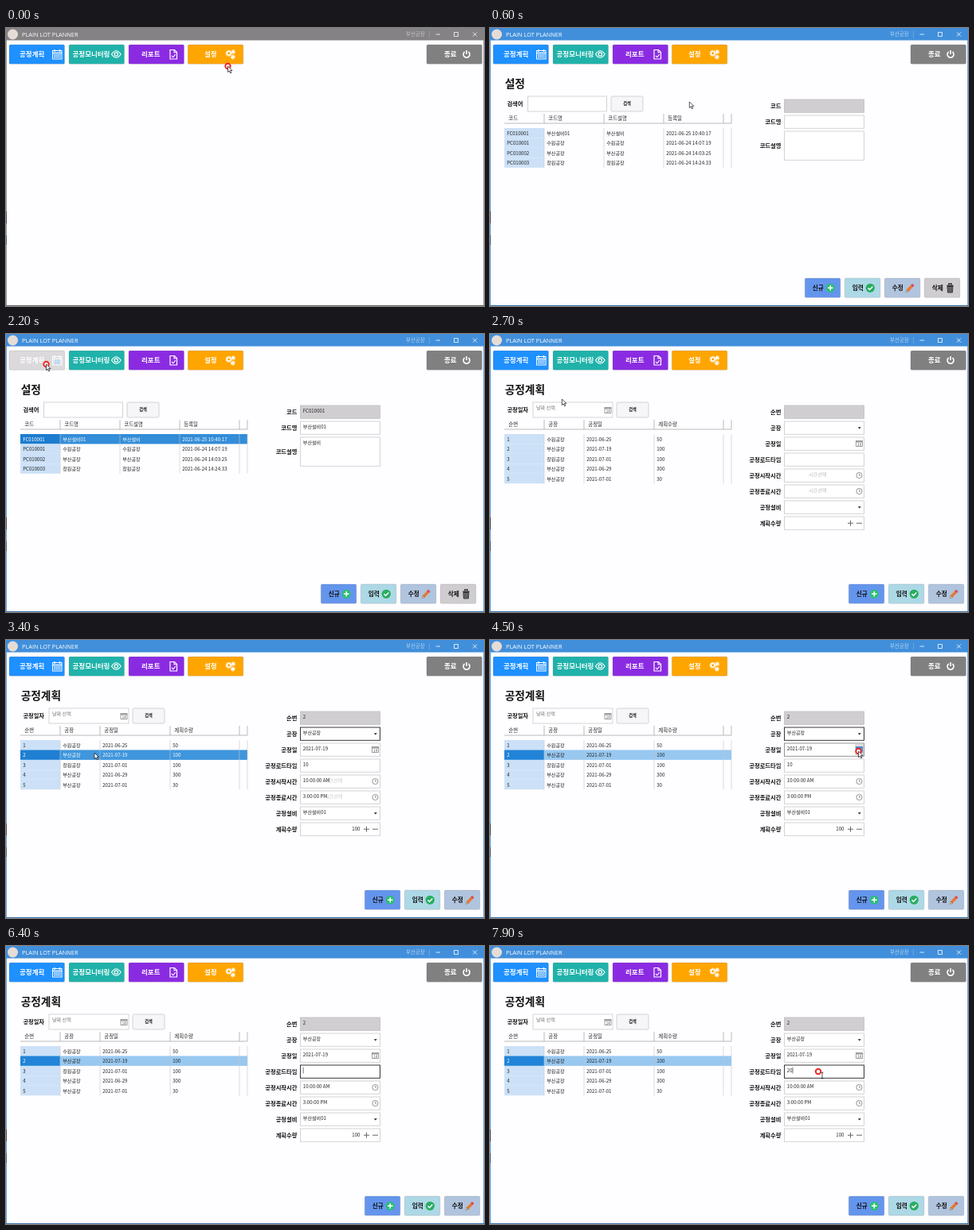
An HTML page for the animation above (8000 ms loop, 600 px wide and 350 px high).

```html
<!DOCTYPE html>
<html>
<head>
<meta charset="utf-8">
<style>
html, body { margin: 0; width: 100%; height: 100%; overflow: hidden; background: #fefdff }
svg { display: block; width: 600px; height: 350px; font-family: "Noto Sans CJK KR", "Noto Sans CJK JP", "Noto Sans CJK", sans-serif; white-space: pre }
</style>
</head>
<body>
<svg id="stage" viewBox="0 0 600 350"></svg>
<script>
const LOOP = 8000;
const stage = document.getElementById('stage');

const rect = (x, y, w, h, fill, more = '') => `<rect x="${x}" y="${y}" width="${w}" height="${h}" fill="${fill}" ${more}/>`;
const path = (d, color, width = 1, fill = 'none') => `<path d="${d}" stroke="${color}" stroke-width="${width}" fill="${fill}"/>`;
const ring = (x, y, r, color, width, more = '') => `<circle cx="${x}" cy="${y}" r="${r}" fill="none" stroke="${color}" stroke-width="${width}" ${more}/>`;
const disc = (x, y, r, fill) => `<circle cx="${x}" cy="${y}" r="${r}" fill="${fill}"/>`;
const text = (x, y, s, size = 6.1, fill = '#222', more = '') => `<text x="${x}" y="${y}" font-size="${size}" fill="${fill}" ${more}>${s}</text>`;
const bold = (x, y, s, size, fill = '#111', more = '') => text(x, y, s, size, fill, 'font-weight="700" ' + more);
const box = (x, y, w, h, stroke = '#d0ced2', fill = '#fff') => rect(x, y, w, h, fill, `stroke="${stroke}" stroke-width=".9"`);

// [time, x, y] of the pointer tip
const route = [
  [0, 278.5, 48], [200, 278.5, 48], [900, 232, 122], [1200, 216, 132.5], [1500, 216, 132.5],
  [1900, 58, 40], [2100, 50.5, 38], [2300, 50.5, 38], [2800, 95, 87], [3000, 117, 157],
  [3200, 111, 142], [3500, 111, 142], [4200, 459, 141], [4400, 462.5, 140], [4800, 462.5, 140],
  [5400, 417.5, 170], [5700, 417.5, 170], [6000, 384, 160], [6300, 372, 160],
  [7100, 428, 160], [7400, 417, 163], [8000, 417, 163]
];
const clicks = [[0, 100], [1200, 1300], [2200, 2300], [3200, 3300], [4500, 4800], [5500, 5600], [6000, 6300], [7900, 8000]];
const clamp = v => Math.max(0, Math.min(1, v));
const ease = v => v * v * (3 - 2 * v);

function pointerAt(t) {
  const i = route.findIndex(k => k[0] > t);
  const [a, b] = [route[i - 1], route[i]];
  const k = ease((t - a[0]) / (b[0] - a[0]));
  return [a[1] + (b[1] - a[1]) * k, a[2] + (b[2] - a[2]) * k];
}

const gear = (x, y, r) => ring(x, y, r, '#fff', 1.5) + ring(x, y, r + 1.2, '#fff', 1.3, `stroke-dasharray="${r * .5} ${r * .45}"`);
const icons = {
  calendar: rect(58.5, 28.5, 11.5, 10.5, 'none', 'stroke="#fff"') + path('M58.5 31.5h11.5M61 27v3M67.5 27v3', '#fff', 1.4) +
    path('M60 34h8.5M60 36.5h8.5', '#fff', 1.6) + path('M62 32v6M64.3 32v6M66.6 32v6', '#1e90ff', .5),
  eye: path('M132.5 33q5.8-8.5 11.6 0q-5.8 8.5-11.6 0z', '#fff', 1.2) + ring(138.3, 33, 2.2, '#fff', 1.2),
  report: path('M206 27.5h5.5l3 3v8.5h-8.5z', '#fff', 1.2) + path('M211 27.5v3.3h3.5M208 35l1.8 1.8l3-3.6', '#fff', 1.1),
  gears: gear(279.7, 31.8, 2.3) + gear(285.3, 30, 1) + gear(284.8, 36.5, 1.2),
  power: path('M575.7 30a4 4 0 1 0 4.8 0M578.1 28v5', '#fff', 1.6)
};
const menu = [
  [4, '#1e90ff', 17, '공정계획', icons.calendar], [79, '#20b2aa', 83.5, '공정모니터링', icons.eye],
  [154, '#8a2be2', 170, '리포트', icons.report], [228.3, '#ffa500', 249, '설정', icons.gears],
  [528, '#808080', 550, '종료', icons.power]
];

function shell(active, hover) {
  const bar = active ? '#418fdb' : '#848284';
  return rect(0, 0, 600, 350, '#fefdff') + rect(0, 0, 600, 15.5, bar) + rect(0, 0, .8, 350, bar) +
    rect(599.3, 0, .7, 350, bar) + rect(0, 349, 600, 1, active ? '#3a75ad' : '#6c6c6c') +
    rect(0, 231, 1, 15, '#4a5560') + rect(0, 261, 1, 12, '#4a6d80') +
    disc(8.5, 8, 6.5, '#e6dcd6') +
    text(20, 11, 'PLAIN LOT PLANNER', 7.4, '#fff', 'style="font-family:\'Open Sans\',sans-serif"') +
    text(502, 10.4, '부산공장', 6.4, active ? '#b9d6f2' : '#c9c7c9') +
    path('M531.5 4v8', active ? '#77afe4' : '#a5a3a5', .7) +
    path('M539.5 8h5.5M562.5 5.5h5v5h-5zM586 5.5l5 5M591 5.5l-5 5', '#fff', .8) +
    menu.map(([x, color, tx, label, icon], i) =>
      rect(x, 21, 69.5, 24.3, hover && !i ? '#dbd9db' : color, 'rx="1.5" stroke="#777" stroke-opacity=".35" stroke-width=".6"') +
      bold(tx, 36.3, label, 8.5, '#fff') + icon).join('');
}

const actionIcons = [
  disc(32, 12.3, 5.6, '#2ebd78') + path('M32 9v6.6M28.7 12.3h6.6', '#fff', 1.5),
  disc(32, 12.3, 5.6, '#27ae60') + path('M29.2 12.4l2.1 2.1l3.7-4', '#fff', 1.5),
  path('M28.5 16l6.5-7', '#e8792f', 3.4) + path('M34.3 9.8l1.7-1.8', '#d8485a', 3.4) + path('M27 17.6l1-3.2l2.2 2z', '#444', .4, '#f3d2a2'),
  path('M28 9.3h8.5M30.5 8.5v-1.5h3.5v1.5', '#333', 1.3) + path('M28.7 10.5h7l-.6 7.5h-5.8z', '#333', 1, '#777') + path('M31 11.5v5.5M33.5 11.5v5.5', '#333', .8)
];
const actions = (left, count) => ['신규', '입력', '수정', '삭제'].slice(0, count).map((label, i) =>
  `<g transform="translate(${left + 50 * i} 315)">` +
  rect(0, 0, 44.5, 24.3, ['#6495ed', '#add8e6', '#b0c4de', '#d0cdd0'][i], 'rx="1.5" stroke="#777" stroke-opacity=".4" stroke-width=".6"') +
  bold(9.5, 15, label, 7.7) + actionIcons[i] + '</g>').join('');

const searchButton = x => rect(x, 86, 40, 19, '#f6f5f7', 'rx="1.5" stroke="#cfcdd0" stroke-width=".9"') + bold(x + 15.3, 97.4, '검색', 5.2);

function dateIcon(x, y, fill = 'none', color = '#888') {
  return rect(x, y + 1, 8, 7, fill, `stroke="${color}" stroke-width=".8"`) + path(`M${x} ${y + 2.3}h8`, color, 1.2) + bold(x + 1.7, y + 7.2, '14', 4.2, color);
}

function table(cols, heads, rows, selected, look, hoverY) {
  const pitch = 12.45;
  let out = path('M18 120h285', '#aaa', .8);
  heads.forEach((h, i) => out += text((i ? cols[i - 1] : 18) + 5.3, 115.7, h, 6.4, '#222', 'font-weight="500"'));
  rows.forEach((row, i) => {
    const y = 126 + pitch * i, on = i === selected;
    const hot = hoverY >= y && hoverY < y + pitch;
    out += rect(18, y, 50, pitch, on ? look.first : '#cce1f7');
    if (on || hot) out += rect(68, y, 235, pitch, on ? look.rest : '#d5e7f8');
    row.forEach((s, j) => out += text((j ? cols[j - 1] : 18) + 3.2, y + 8.7, s, 6.1, on && (!j || look.light) ? '#fff' : '#222'));
  });
  const end = 126 + pitch * rows.length;
  cols.forEach(x => out += path(`M${x} 108v12`, '#aaa', .8) + path(`M${x} 126V${end}`, '#c9c8cc', .6));
  return out;
}

const field = (label, y, value = '', stroke, fill, h = 16.3) =>
  bold(365.5, y + (h > 20 ? 20.5 : 11), label, 7.3, '#111', 'text-anchor="end"') + box(369.5, y, 100, h, stroke, fill) + text(372.8, y + 9.3, value);

function settingsPage(t, pointer) {
  const filled = t >= 1300;
  const look = t < 1600 ? { first: '#2689de', rest: '#60a8e7', light: 1 } : { first: '#1c7ccf', rest: '#338dd8', light: 1 };
  return bold(18.7, 74.8, '설정', 13.7) + bold(21.5, 98.3, '검색어', 7.2) + box(47.5, 86, 99, 19) + searchButton(152) +
    table([68, 143, 218, 293, 303], ['코드', '코드명', '코드설명', '등록일'], [
      ['FC010001', '부산설비01', '부산설비', '2021-06-25 10:40:17'],
      ['PC010001', '수원공장', '수원공장', '2021-06-24 14:07:19'],
      ['PC010002', '부산공장', '부산공장', '2021-06-24 14:03:25'],
      ['PC010003', '창원공장', '창원공장', '2021-06-24 14:24:33']
    ], filled ? 0 : -1, look, pointer[0] < 303 ? pointer[1] : 0) +
    field('코드', 90, filled ? 'FC010001' : '', '#c4c2c4', '#d1ced1') +
    field('코드명', 110, filled ? '부산설비01' : '') +
    field('코드설명', 130, filled ? '부산설비' : '', undefined, undefined, 36.3) +
    actions(395.3, 4);
}

function planPage(t, pointer) {
  const filled = t >= 3400, v = s => filled ? s : '';
  const editing = t >= 6000, dateHot = t >= 4300 && t < 5000;
  const load = t < 6400 ? '10' : t < 6800 ? '' : t < 7100 ? '2' : '20';
  const look = t < 3700 ? { first: '#1f7fd2', rest: '#3f96dd', light: 1 } : { first: '#2184d8', rest: '#98c8f0' };
  const hint = (1 - clamp((t - 3300) / 500)) * .6;
  const clock = y => ring(463.5, y, 3.6, '#888', .9) + path(`M463.5 ${y - 2.2}v2.4h1.8`, '#888', .8);
  const prompt = y => hint ? text(400, y, '시간선택', 6.1, '#888', `opacity="${hint}"`) : '';
  const arrow = y => path(`M461.8 ${y}h4l-2 2.2z`, 'none', 0, '#222');
  const dark = '#222';
  return bold(18.7, 74.8, '공정계획', 13.7) + bold(21.5, 98.3, '공정일자', 7.2) + box(54, 86, 100, 19) +
    text(58, 94.5, '날짜 선택', 6.1, '#777') + dateIcon(144, 91.5) + searchButton(159) +
    table([68, 118, 206, 293, 303], ['순번', '공장', '공정일', '계획수량'], [
      ['1', '수원공장', '2021-06-25', '50'], ['2', '부산공장', '2021-07-19', '100'],
      ['3', '창원공장', '2021-07-01', '100'], ['4', '부산공장', '2021-06-29', '300'],
      ['5', '부산공장', '2021-07-01', '30']
    ], t >= 3200 ? 1 : -1, look, pointer[0] < 303 ? pointer[1] : 0) +
    field('순번', 90, v('2'), '#c4c2c4', '#d1ced1') +
    field('공장', 110, v('부산공장'), filled && !editing ? dark : undefined) + arrow(117.3) +
    field('공정일', 130, v('2021-07-19'), dateHot ? '#888' : undefined) +
    (dateHot ? rect(458, 131, 11, 14.5, '#dedde0') : '') + dateIcon(459.5, 133.5, dateHot ? '#5aa0dd' : 'none', dateHot ? '#417fb8' : '#888') +
    field('공정로드타임', 150, '', editing ? dark : undefined) +
    (t >= 6100 && t < 6400 ? rect(372.5, 152.5, 8, 8, '#8fc0ee') : '') + text(372.8, 159, v(load)) +
    (editing ? path(`M${373.2 + 3.4 * load.length} 152.5v8`, dark, .6) : '') +
    field('공정시작시간', 170, v('10:00:00 AM'), t >= 5300 && t < 5800 ? '#666' : undefined) + prompt(179.3) + clock(178) +
    field('공정종료시간', 190, v('3:00:00 PM')) + prompt(199.3) + clock(198) +
    field('공정설비', 210, v('부산설비01')) + arrow(217.3) +
    field('계획수량', 230) + text(444.5, 240.3, v('100'), 6.1, '#222', 'text-anchor="end"') +
    path('M449 238.2h7M452.5 234.7v7M460 238.2h7', '#666', 1) +
    actions(450.3, 3);
}

function pageIn(content, age) {
  const k = clamp((age + 100) / 500);
  return `<g opacity="${k}" transform="translate(${15 * (1 - ease(k))} 0)">${content}</g>`;
}

function pointerMark(t, [x, y]) {
  if (t >= 6400 && t < 7100) return '';
  const beam = t >= 5900;
  const press = clicks.some(([a, b]) => t >= a && t < b);
  const [rx, ry] = t >= 7400 ? [x - 5, y - 5] : [x, y];
  const mark = press ? disc(rx, ry, 3.4, '#fff') + ring(rx, ry, 3.2, '#ee2a2a', 2) : '';
  return mark + (beam
    ? path(`M${x - 1.5} ${y - 3.8}h3M${x} ${y - 3.8}v7.6M${x - 1.5} ${y + 3.8}h3`, '#222', .8)
    : path(`M${x} ${y}v7.6l1.8-1.6l1.3 2.9l1.3-.6l-1.3-2.8h2.4z`, '#111', .7, '#fff'));
}

function draw(t) {
  const pointer = pointerAt(t);
  const page = t < 100 ? '' : t < 2300 ? pageIn(settingsPage(t, pointer), t - 100) : pageIn(planPage(t, pointer), t - 2300);
  stage.innerHTML = shell(t >= 100, t >= 1800 && t < 2400) + page + pointerMark(t, pointer);
}

const start = performance.now();
let shown = -1;
function tick() {
  const t = Math.floor((performance.now() - start) % LOOP / 100) * 100;
  if (t !== shown) draw(shown = t);
  requestAnimationFrame(tick);
}
tick();
</script>
</body>
</html>
```
